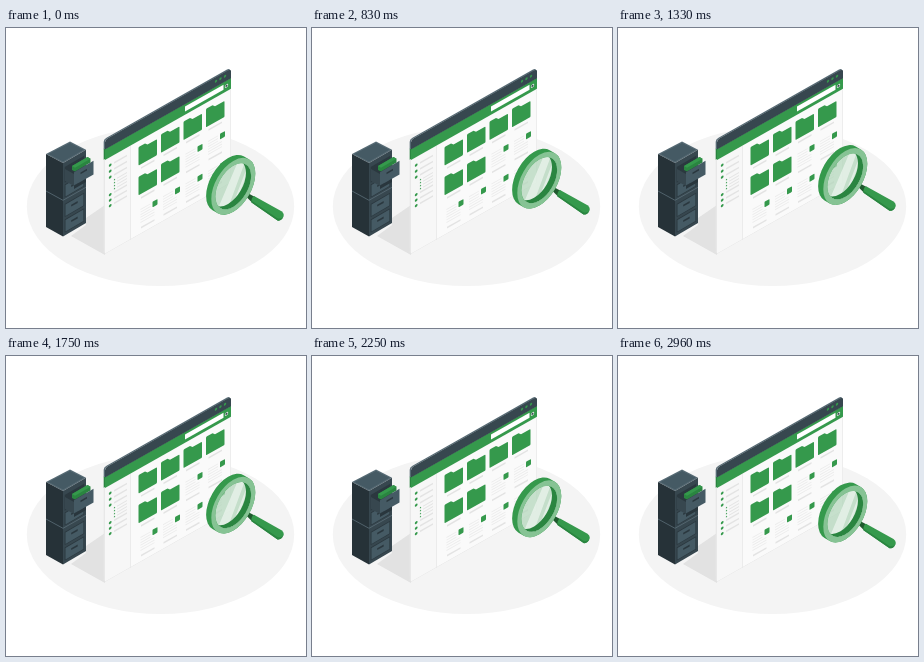
Recreate the animation shown at these times as an HTML page. Size 300 px wide and 300 px high, loop 3 s.

```html
<!DOCTYPE html>
<html lang="en">
<head>
<meta charset="utf-8">
<title>File search</title>
<style>
html, body { margin: 0; width: 100%; height: 100%; overflow: hidden; background: #fff; }
svg { display: block; width: 100vw; height: 100vh; }
</style>
</head>
<body>
<svg viewBox="0 0 300 300">
  <ellipse cx="154.5" cy="178.500" rx="133.7" ry="79.500" fill="#f4f4f4"/>
  <path d="M65 208L99 227V177L80 190V197Z" fill="#e2e2e2"/>

  <g id="cabinet">
    <path d="M40 126L64 113.500L80 121.800L57 135Z" fill="#566a74"/>
    <path d="M42.500 126L64 115L77.500 121.800L57 133.500Z" fill="#455a64"/>
    <path d="M40 126L57 135V208.500L40 199Z" fill="#263238"/>
    <path d="M57 135L80 121.800V195L57 208.500Z" fill="#37474f"/>
    <path d="M40 163L57 172.300L80 159.300" fill="none" stroke="#5b6e78" stroke-width=".8"/>
  </g>

  <g id="window" transform="matrix(1 -.565 0 1 99 112)"></g>

  <g id="lens">
    <path d="M240 168.500L243.500 166L249 169L246 174.500Z" fill="#1f5a2e"/>
    <path d="M248 168L275.500 183.300Q278.500 185.500 277.500 188.500Q275.500 193 271.500 192.600L245.500 174.500Q245 169.500 248 168Z" fill="#35994c"/>
    <path d="M245.500 174.500L271.500 192.600Q275.500 193 277.300 189Q274 191.500 271 190L245.700 172.800Z" fill="#2a8540"/>
    <g transform="matrix(.866 -.5 0 1 227.300 158.300)">
      <clipPath id="hole"><circle r="20.600"/></clipPath>
      <mask id="body" maskUnits="userSpaceOnUse" x="-40" y="-40" width="80" height="80">
        <path d="M-40-40H40V40H-40Z" fill="#fff"/><circle r="20.600"/>
      </mask>
      <path d="M0 0L-6-6" stroke="#35994c" stroke-width="50.800" stroke-linecap="round" mask="url(#body)"/>
      <g clip-path="url(#hole)">
        <circle cx="-4" cy="-4" r="21" fill="#b4d7bc" opacity=".75"/>
        <path d="M-22 20L8-26H18L-9 24ZM-4 24L20-18H23L0 24Z" fill="#fff" opacity=".5"/>
        <circle cx="-6" cy="-6" r="26" fill="none" stroke="#2a8540" stroke-width="10.800"/>
      </g>
      <circle r="23" fill="none" stroke="#86c394" stroke-width="4.800"/>
    </g>
  </g>
</svg>
<script>
const GREEN = '#35994c', DARK = '#37474f', GREY = '#e3e3e3';
const $ = id => document.getElementById(id);
const rect = (x, y, w, h, fill, r = 0) =>
  `<rect x="${x}" y="${y}" width="${w}" height="${h}" rx="${r}" fill="${fill}"/>`;
const dot = (x, y, r, fill = GREEN) => `<circle cx="${x}" cy="${y}" r="${r}" fill="${fill}"/>`;
const path = (d, fill) => `<path d="${d}" fill="${fill}"/>`;

// Closed drawer: a panel with a small grip on the right face
const drawer = (x, y) =>
  path(`M${x} ${y}l19.500-11.300v13l-19.500 11.300z`, '#2b383f') +
  path(`M${x + .8} ${y + .4}l17.900-10.400v11.600l-17.900 10.400z`, '#455a64') +
  path(`M${x + 6.500} ${y + .8}l6.500-3.700v1.800l-6.500 3.700z`, '#2b383f');

$('cabinet').innerHTML +=
  drawer(58.7, 176) + drawer(58.7, 191.5) + drawer(58.7, 156.5) +
  path('M58.700 139l19.500-11.300v13l-19.500 14z', '#2b383f') +
  path('M59 141l9 5v12l-9-5z', '#37474f') +
  path('M66 138L81.500 129L84.500 130.700V134.500L69 143.500L66 142Z', '#2a8540') +
  path('M66 138L81.500 129L84.500 130.700L69 139.700Z', GREEN) +
  path('M68 144.200L87.500 132.800V146.500L76 153L68 157.500Z', '#455a64') +
  path('M74.500 144.500l6.500-3.700v1.800l-6.500 3.700z', '#2b383f') +
  path('M68 157.500L80 150.800V154L68 161Z', '#29363d');

// Browser window, drawn flat and skewed by its group
function sidebar() {
  let out = rect(0, 20, 25, 94, '#f7f7f7') + rect(25, 20, .7, 94, '#e4e4e4');
  for (const y of [28, 34, 40, 57.5, 63, 68.5])
    out += dot(5.2, y, 1.4) + rect(9, y - .8, 13, 1.6, GREY);
  for (let i = 0; i < 4; i++)
    out += dot(9.5, 45 + i * 3, .7) + rect(12, 44.5 + i * 3, 10, 1, GREY);
  return out;
}
const folder = (x, y) =>
  path(`M${x} ${y + 2}q0-1 1-1h5.500l2.500 2.500h8.500q1 0 1 1v14q0 1-1 1h-16.500q-1 0-1-1z`, GREEN);

function sheet(x, y) {
  let out = '';
  for (let i = 0; i < 6; i++)
    out += rect(x + 2, y + 4.5 + i * 2.6, i < 3 ? 10 : 14, .9, '#ebebeb');
  return out + rect(x + 14, y + 4, 5, 5.6, GREEN, .8);
}
// The back edge shows as a thin rim along the left and the top
let page = rect(-1.3, 0, 6, 112.5, '#e8e8e8', 1) +
  path('M-1.300 19V8H5V19Z', '#2a8540') +
  path('M-1.300 8.500V1Q-1.300-1.500 1.500-1.500H122Q125-1.500 125.500 2V8.500Z', '#566a74') +
  rect(0, 0, 126, 114, '#fafafa', 2) + sidebar() +
  path('M0 20V9H126V20Z', GREEN) +
  path('M0 9.500V2.500Q0-.200 2.800-.200H123Q126-.200 126 2.500V9.500Z', DARK) +
  rect(80, 11.8, 38.5, 4.8, '#fff') +
  dot(121.5, 14.5, 1.7, '#dfe5e1') + dot(121.5, 14.5, 1, DARK);
for (const x of [111, 115.5, 120]) page += dot(x, 4, 1.2);
for (let row = 0; row < 3; row++)
  for (let col = 0; col < 4; col++) {
    const x = 33.5 + 22.5 * col, y = 25 + 29.8 * row;
    page += (row == 0 || row == 1 && col < 2 ? folder : sheet)(x, y) +
      rect(x + 2.5, y + 22.5, 13.5, 1.7, GREY);
  }
page += path('M125.400 20H126V114H0V113.400H125.400Z', '#e4e4e4');
$('window').innerHTML = page;

// The lens rises 11px and sinks back at constant speed, 24 poses per second
function tick() {
  const p = Math.floor(performance.now() % 3000 * .024 + .1) / 72;
  const lift = 11 * (1 - Math.abs(1 - 2 * p));
  $('lens').setAttribute('transform', `translate(0 ${-lift})`);
  requestAnimationFrame(tick);
}
tick();
</script>
</body>
</html>
```
